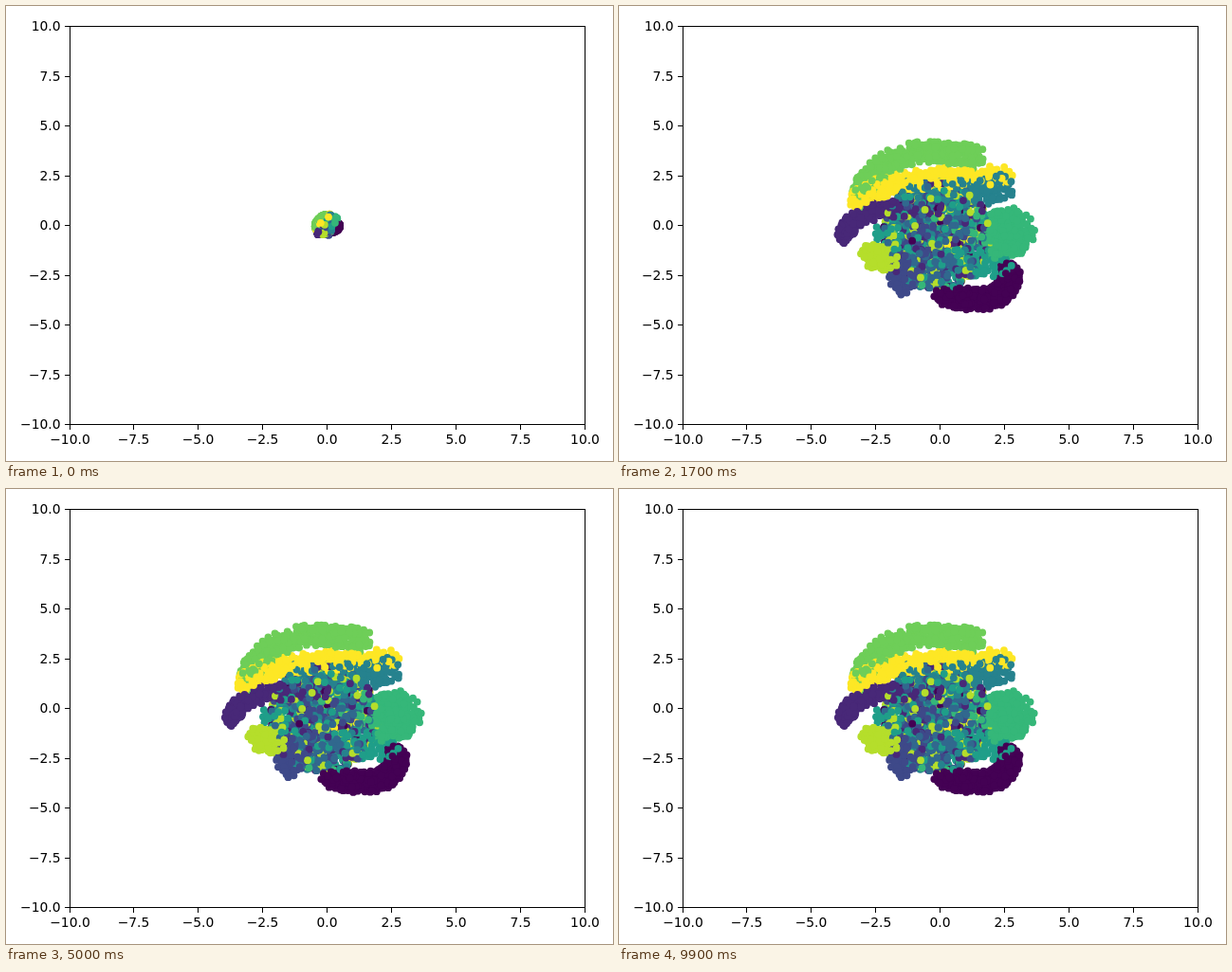
An HTML page with a canvas for the animation above (10 s loop, 640 px wide and 480 px high).

```html
<!DOCTYPE html>
<html lang="en">
<head>
<meta charset="utf-8">
<title>Scatter embedding</title>
<style>
  html, body { margin: 0; width: 100%; height: 100%; overflow: hidden; background: #fff; }
  canvas { display: block; }
</style>
</head>
<body>
<canvas id="stage" width="640" height="480"></canvas>
<script>
const ctx = document.getElementById('stage').getContext('2d');
const CX = 338.5, CY = 231, DOT = 3.9;
const PER_CLASS = 250, HUBS = 40, TRIES = 4;
const CORE = { x: 335, y: 242, radius: 57 };

// Each class is a band along a quadratic curve (start, bend, end);
// the share "mixed" of its points lies scattered in the common core.
const band = (color, start, bend, end, width, mixed) =>
  ({ color, start, bend, end, width, mixed, points: [] });
const classes = [
  band('#440154', [342, 303], [409, 322], [412, 281], 12, 0.06),
  band('#482878', [238, 242], [246, 208], [336, 214], 9, 0.2),
  band('#3e4989', [300, 289], [305, 275], [322, 238], 16, 0.3),
  band('#31688e', [325, 282], [345, 270], [362, 235], 18, 0.35),
  band('#26828e', [302, 199], [370, 200], [402, 191], 15, 0.3),
  band('#1f9e89', [280, 238], [350, 270], [400, 272], 15, 0.4),
  band('#35b779', [413, 238], [405, 238], [392, 242], 26, 0.1),
  band('#6ece58', [253, 203], [280, 136], [379, 161], 12, 0),
  band('#b5de2b', [265, 262], [276, 268], [286, 264], 13, 0.5),
  band('#fde725', [251, 204], [290, 178], [405, 180], 11, 0.04)
];

let seed = 20;
function random() {
  seed = (seed + 0x6D2B79F5) | 0;
  let t = Math.imul(seed ^ (seed >>> 15), 1 | seed);
  t = (t + Math.imul(t ^ (t >>> 7), 61 | t)) ^ t;
  return ((t ^ (t >>> 14)) >>> 0) / 4294967296;
}

const distance = (a, b) => Math.hypot(a.x - b.x, a.y - b.y);

function inDisc(x, y, radius) {
  const r = radius * Math.sqrt(random()), a = random() * 2 * Math.PI;
  return { x: x + r * Math.cos(a) - CX, y: y + r * Math.sin(a) - CY };
}

function inBand({ start, bend, end, width }) {
  const t = random(), u = 1 - t;
  const [x, y] = [0, 1].map(k => u * u * start[k] + 2 * u * t * bend[k] + t * t * end[k]);
  return inDisc(x, y, width);
}

// Of a few candidates keep the loneliest, as points of a class repel each other.
function place(group) {
  const mixed = random() < group.mixed;
  let best, bestGap = -1;
  for (let k = 0; k < TRIES; k++) {
    const p = mixed ? inDisc(CORE.x, CORE.y, CORE.radius) : inBand(group);
    const gap = Math.min(...group.points.map(q => distance(p, q)));
    if (gap > bestGap) [best, bestGap] = [p, gap];
  }
  return best;
}

const points = [];
for (let i = 0; i < PER_CLASS; i++) {
  for (const group of classes) {
    const p = place(group);
    p.color = group.color;
    group.points.push(p);
    points.push(p);
  }
}

// Early on every point is drawn towards the nearest hub of its class.
for (const group of classes) {
  const hubs = group.points.slice(0, HUBS);
  for (const p of group.points) p.hub = hubs.reduce((a, b) => distance(p, b) < distance(p, a) ? b : a);
}

// Slow growth, a sudden expansion with overshoot, then rest.
function scaleAt(n) {
  if (n < 10) return 0.45 - 0.32 * Math.exp(-n / 2.5);
  if (n === 10) return 0.8;
  return 1 + 0.11 * Math.exp(-(n - 11) / 1.8);
}

function drawPoints(n) {
  const scale = scaleAt(n);
  const bunch = 0.5 * Math.exp(-Math.max(0, n - 9));
  const turn = -0.7 * Math.exp(-n / 2);
  const cos = scale * Math.cos(turn), sin = scale * Math.sin(turn);
  for (const p of points) {
    const x = p.x + (p.hub.x - p.x) * bunch;
    const y = p.y + (p.hub.y - p.y) * bunch;
    ctx.fillStyle = p.color;
    ctx.beginPath();
    ctx.arc(CX + x * cos - y * sin, CY + x * sin + y * cos, DOT, 0, 2 * Math.PI);
    ctx.fill();
  }
}

function drawAxes() {
  ctx.fillStyle = ctx.strokeStyle = '#000';
  ctx.lineWidth = 1;
  ctx.font = '13.89px "DejaVu Sans", sans-serif';
  ctx.strokeRect(67.5, 21.5, 543, 420);
  for (let i = 0; i <= 8; i++) {
    const label = (-10 + 2.5 * i).toFixed(1).replace('-', '\u2212');
    const x = 67 + Math.floor(67.875 * i);
    const y = 441 - Math.floor(52.5 * i);
    ctx.fillRect(x, 442, 1, 5);
    ctx.fillRect(62, y, 5, 1);
    ctx.textAlign = 'center';
    ctx.fillText(label, x + 0.5, 462);
    ctx.textAlign = 'right';
    ctx.fillText(label, 57.6, y + 5);
  }
}

let shown = -1;
function tick() {
  const n = Math.floor(performance.now() % 10000 / 100);
  if (n !== shown) {
    shown = n;
    ctx.fillStyle = '#fff';
    ctx.fillRect(0, 0, 640, 480);
    drawPoints(n);
    drawAxes();
  }
  requestAnimationFrame(tick);
}
tick();
</script>
</body>
</html>
```
